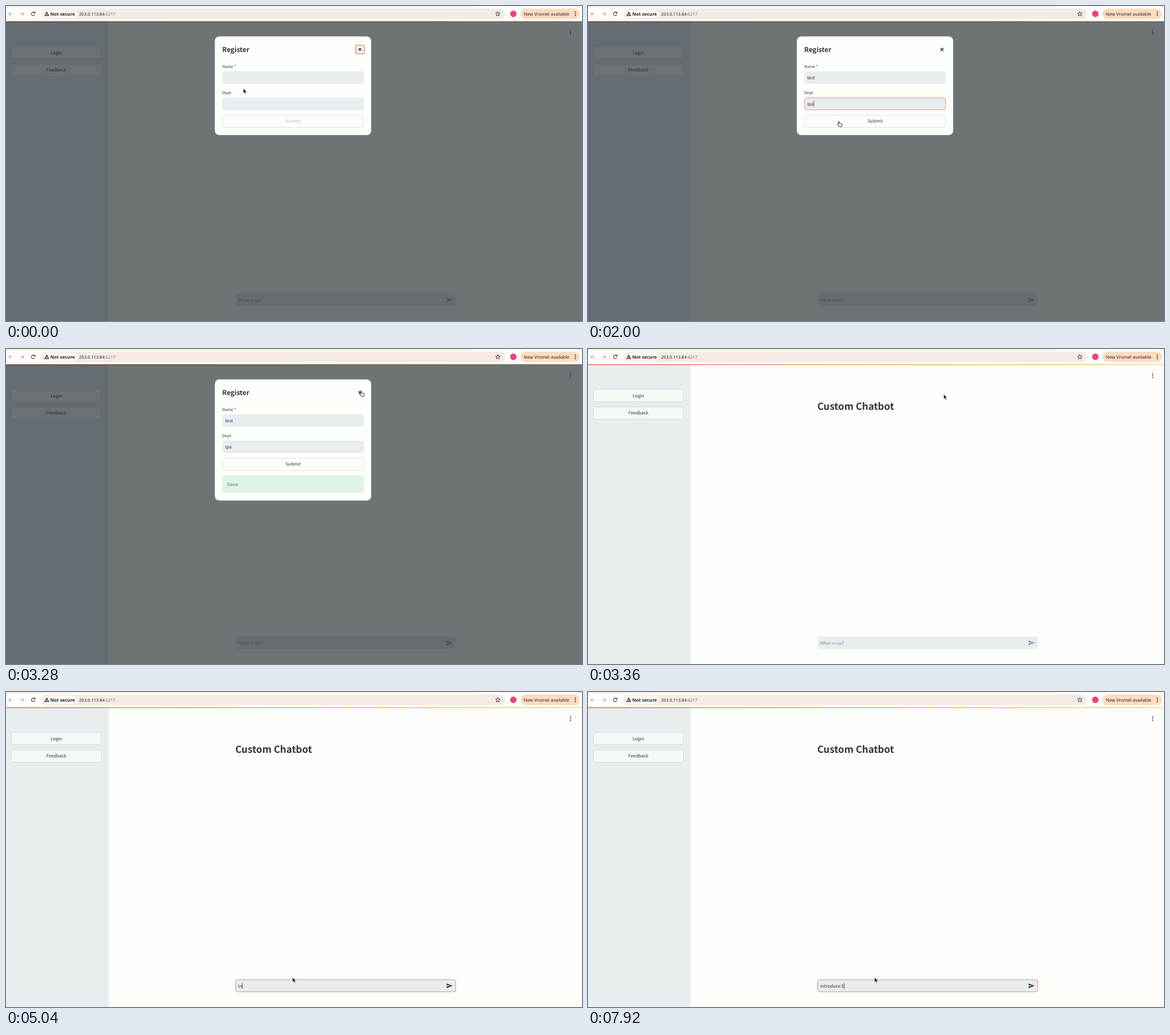
Recreate the animation shown at these times as an HTML page. Size 1011x554 px, loop 8000 ms.

```html
<!DOCTYPE html>
<html lang="en">
<head>
<meta charset="utf-8">
<title>Register and chat</title>
<style>
html, body { margin: 0; width: 100%; height: 100%; overflow: hidden; background: #fefffa; }
svg { display: block; width: 1011px; height: 554px; }
text {
  font: 7.88px "Noto Sans CJK KR", "Noto Sans CJK JP", "Noto Sans CJK SC", "Noto Sans CJK", "Noto Sans", sans-serif;
  fill: #31333f; text-rendering: geometricPrecision; white-space: pre;
}
.ui text { font-family: "Noto Sans", sans-serif; fill: #25221f; }
.label { font-size: 6.9px; }
.mid { text-anchor: middle; }
.field { fill: #e8edf0; stroke: #e8edf0; }
.focus { stroke: #dc8a7e; }
.button { fill: #fefffa; stroke: #d9dddb; }
.popup { filter: drop-shadow(0 1px 1.5px #0004); }
.line { fill: none; stroke-width: 1.1; }
</style>
</head>
<body>
<svg viewBox="0 0 1011 554">
  <defs>
    <linearGradient id="rainbow">
      <stop stop-color="#f0604c"/><stop offset=".5" stop-color="#f7a04e"/><stop offset="1" stop-color="#f6e08a"/>
    </linearGradient>
  </defs>

  <!-- page -->
  <rect width="1011" height="554" fill="#fefffa"/>
  <rect y="27" width="180.5" height="527" fill="#e8edf0"/>
  <rect y="26.7" width="1011" height="1.5" fill="url(#rainbow)"/>
  <g fill="#f5f9f6" stroke="#cfd5d6" stroke-width=".8">
    <rect x="9.5" y="71" width="158" height="21.5" rx="4"/>
    <rect x="9.5" y="102" width="158" height="21.5" rx="4"/>
  </g>
  <text class="mid" x="88.4" y="84.6">Login</text>
  <text class="mid" x="88.4" y="115.4">Feedback</text>
  <g fill="#31333f">
    <circle cx="991" cy="43.5" r="1"/><circle cx="991" cy="46.8" r="1"/><circle cx="991" cy="50.1" r="1"/>
  </g>
  <text x="402.4" y="107.3" style="font-size:17px;font-weight:700">Custom Chatbot</text>
  <rect id="chat" class="field" x="403" y="506" width="386.3" height="21.3" rx="4" stroke-width=".9"/>
  <text id="prompt" x="407.5" y="519.8"></text>
  <path id="send" d="M773.3 512.6 784 516.8 773.3 521V517.8L780 516.8 773.3 515.8Z"/>

  <!-- dialog -->
  <g id="dialog">
    <rect y="27" width="1011" height="527" fill="rgb(31,39,45)" fill-opacity=".64"/>
    <rect id="card" x="366.5" y="53.5" width="274.5" rx="8" fill="#fefffa"/>
    <text x="379.5" y="81" style="font-size:11.8px;font-weight:700">Register</text>
    <rect id="closeRing" x="614" y="69" width="14.8" height="14.8" rx="1" fill="none" stroke="#e8927f" stroke-width="1.6"/>
    <path d="M618.8 74l5 5m0-5l-5 5" stroke="#25272f" stroke-width="1.3"/>
    <text class="label" x="379.6" y="108.7">Name *</text>
    <rect id="nameBox" class="field" x="380" y="115.2" width="247.6" height="21.3" rx="4" stroke-width=".9"/>
    <text id="name" x="384.7" y="128.8"></text>
    <text class="label" x="379.6" y="155">Dept.</text>
    <rect id="deptBox" class="field" x="380" y="161.4" width="247.6" height="21.3" rx="4" stroke-width=".9"/>
    <text id="dept" x="384.7" y="175"></text>
    <rect id="submitBox" class="button" x="380" y="192.2" width="247.6" height="21.3" rx="4" stroke-width=".9"/>
    <text id="submit" class="mid" x="503.8" y="205.4">Submit</text>
    <g id="done">
      <rect x="379.6" y="222.8" width="248.4" height="30.4" rx="4" fill="#dff3e7"/>
      <text x="388.3" y="241.2" style="fill:#6a7358">Done</text>
    </g>
    <g id="popup" class="ui popup">
      <rect x="434.5" y="187" width="85.5" height="24.6" rx="3" fill="#fafbfb"/>
      <text id="option" x="441" y="202.6" style="font-size:8.5px;font-weight:600"></text>
    </g>
  </g>
  <rect id="caret" width=".8" height="11" fill="#31333f"/>

  <!-- browser bar -->
  <g class="ui">
    <rect width="1011" height="26.7" fill="#fffdfa"/>
    <rect width="820" height="1.2" fill="#fddcc2"/>
    <rect y="26.2" width="1011" height=".7" fill="#f6dfcc"/>
    <rect x="62.5" y="4.5" width="813.5" height="18.6" rx="9.3" fill="#f4ebe5"/>
    <rect x="65" y="6.6" width="59.5" height="14.4" rx="7.2" fill="#fefaf7"/>
    <path class="line" stroke="#b5b0ac" d="M11.8 13.8H5.2m3.1-3.2-3.2 3.2 3.2 3.2M24.6 13.8h6.6m-3.1-3.2 3.2 3.2-3.2 3.2"/>
    <path class="line" stroke="#3b3734" d="M50.1 11.7a3.1 3.1 0 1 0 .6 3M51 10v2.5h-2.6"/>
    <path class="line" stroke="#25221f" d="M71.5 10.6 75 16.9H68ZM71.5 12.7v2M71.5 15.2v.9"/>
    <text x="77.8" y="16.7" style="font-size:8px;font-weight:600">Not secure</text>
    <text x="128.3" y="16.5" style="font-size:7.5px">203.0.113.84<tspan fill="#76706b">:6217</tspan></text>
    <path id="star" class="line" stroke="#3b3734" stroke-linejoin="round" style="stroke-width:1"/>
    <circle cx="890.5" cy="13.8" r="5.7" fill="#e8467c"/>
    <rect x="903" y="4.5" width="104.5" height="18.6" rx="9.3" fill="#fddcc2"/>
    <text x="908.7" y="16.5" style="font-size:7.95px">New Vromel available</text>
    <g fill="#25221f">
      <circle cx="999.3" cy="10.6" r="1"/><circle cx="999.3" cy="13.8" r="1"/><circle cx="999.3" cy="17" r="1"/>
    </g>
  </g>

  <g id="cursor" stroke-linejoin="round">
    <path id="arrow" d="M0 0V8.6L2 6.8 3.5 10 5 9.3 3.5 6.2H6.2Z" fill="#16181a" stroke="#fff" stroke-width=".6"/>
    <path id="beam" class="line" d="M-2-4.6Q0-4.6 0-3.6V3.6Q0 4.6-2 4.6M2-4.6Q0-4.6 0-3.6M0 3.6Q0 4.6 2 4.6" stroke="#25272f" style="stroke-width:.8"/>
    <path id="hand" d="M-.6 0Q.4-.8 1 .4V3.4L5 4.2Q6 4.6 5.8 6L5 9.2H.8L-2 5.6Q-2 4.6-.6 5.4Z" fill="#fff" stroke="#16181a" stroke-width=".9"/>
  </g>
</svg>
<script>
const LOOP = 8000, STEP = 80;
const $ = id => document.getElementById(id);
const set = (id, attrs) => { for (const k in attrs) $(id).setAttribute(k, attrs[k]); };
const show = (id, on) => set(id, { opacity: +on });
const ramp = (t, a, b) => Math.min(1, Math.max(0, (t - a) / (b - a)));
const within = (t, a, b) => t >= a && t < b;

// time, x, y of the pointer
const path = [
  [0, 416.5, 145], [320, 418, 127], [480, 418, 127], [800, 438, 152], [880, 438, 152],
  [1120, 414.5, 165.3], [1280, 414.5, 165.3], [1520, 440, 199], [2000, 440, 203],
  [2160, 438, 204], [2320, 436.5, 221], [2560, 460, 361], [2960, 616, 66], [3200, 623, 74],
  [3280, 623, 74], [3360, 624.3, 79.5], [3840, 503, 517], [4000, 503, 517], [4240, 503, 502]
];
// when each letter of the prompt arrives
const prompt = "introduce E";
const keys = [4800, 5040, 5200, 5440, 5680, 6080, 6400, 6480, 6720, 6800, 7920];

function pointerAt(t) {
  const i = path.findIndex(p => p[0] > t);
  if (i < 0) return path[path.length - 1].slice(1);
  const [t0, x0, y0] = path[i - 1], [t1, x1, y1] = path[i];
  const k = ramp(t, t0, t1);
  return [x0 + (x1 - x0) * k, y0 + (y1 - y0) * k];
}

function drawPointer(t) {
  const [x, y] = pointerAt(t), open = t < 3360;
  const overField = (left, right, top, bottom) => x > left && x < right && y > top && y < bottom;
  const choosing = within(t, 560, 960) || within(t, 1440, 2000);
  const beam = !choosing && (open
    ? overField(380, 628, 115, 137) || overField(380, 628, 161, 183)
    : overField(403, 770, 506, 528));
  const hand = open && (overField(613, 630, 68, 85) || within(t, 2000, 2240));
  set("cursor", { transform: `translate(${x} ${y})` });
  show("beam", beam);
  show("hand", hand);
  show("arrow", !beam && !hand);
}

function drawForm(t) {
  const nameFocus = within(t, 400, 1280), deptFocus = within(t, 1280, 2160);
  const enabled = t >= 1840, pressed = within(t, 2160, 2720), first = t < 1200;
  show("dialog", t < 3360);
  show("closeRing", t < 400);
  set("card", { height: t < 2160 ? 173.5 : 213 });
  $("name").textContent = t >= 880 ? "test" : "";
  $("dept").textContent = t >= 1760 ? "ipa" : "";
  set("nameBox", { class: nameFocus ? "field focus" : "field" });
  set("deptBox", { class: deptFocus ? "field focus" : "field" });
  $("submitBox").style.stroke = pressed ? "#d0706c" : "";
  $("submit").style.fill = pressed ? "#dd5f50" : enabled ? "#31333f" : "#b4b8b8";
  show("done", 0);
  set("done", { opacity: ramp(t, 2310, 2640) });
  $("option").textContent = first ? "test" : "ipa";
  set("popup", {
    transform: `translate(0 ${first ? -46 : 0})`,
    opacity: first ? (t >= 480) * (1 - ramp(t, 880, 1120)) : (t >= 1280) * (1 - ramp(t, 1680, 2000))
  });
}

function drawChat(t) {
  const typed = keys.filter(k => k <= t).length;
  $("prompt").textContent = typed ? prompt.slice(0, typed) : "What is up?";
  $("prompt").style.fill = typed ? "#31333f" : "#868b90";
  set("chat", { class: t >= 4000 ? "field focus" : "field" });
  $("chat").style.stroke = t >= 4000 ? "#dd7b7b" : "";
  set("send", { fill: typed ? "#41444d" : "#8f959a" });
  return typed;
}

function drawCaret(t, typed) {
  const end = id => 384.7 + $(id).getComputedTextLength();
  let x, y;
  if (within(t, 400, 1280)) [x, y] = [end("name"), 120.2];
  else if (within(t, 1280, 2160)) [x, y] = [end("dept"), 166.5];
  else if (t >= 4080) [x, y] = [407.5 + (typed ? $("prompt").getSubStringLength(0, typed) : 0), 511.3];
  const blink = within(t, 4640, 4800) || within(t, 7440, 7920);
  show("caret", x !== undefined && !blink);
  if (x !== undefined) set("caret", { x: x - .2, y });
}

function frame(now) {
  const t = Math.floor(now % LOOP / STEP) * STEP;
  drawForm(t);
  drawCaret(t, drawChat(t));
  drawPointer(t);
  requestAnimationFrame(frame);
}

const corners = Array.from({ length: 10 }, (_, i) => {
  const a = i * Math.PI / 5, r = i % 2 ? 1.9 : 4.3;
  return `${863.3 + r * Math.sin(a)} ${14 - r * Math.cos(a)}`;
});
set("star", { d: `M${corners.join("L")}Z` });
requestAnimationFrame(frame);
</script>
</body>
</html>
```
